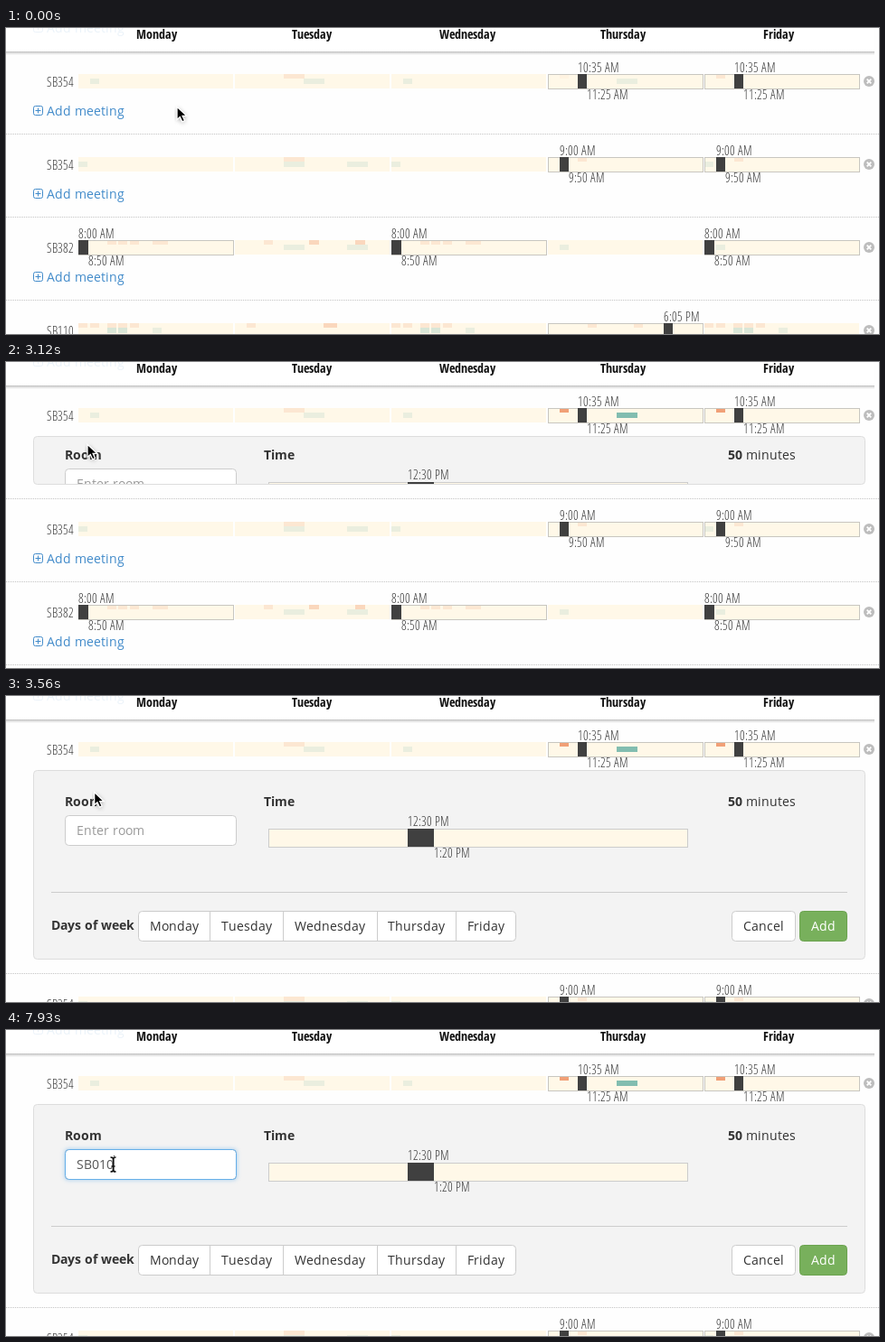
An HTML page that plays this animation: 965x339 px, repeating every 8000 ms.

```html
<!DOCTYPE html>
<html lang="en">
<head>
<meta charset="utf-8">
<title>Weekly meetings</title>
<style>
html, body { margin: 0; width: 100%; height: 100%; overflow: hidden; background: #fefefe; }
svg { display: block; width: 965px; height: 339px; }
text { white-space: pre; }
.link text { fill: #428bca; }
.link path { stroke: #428bca; fill: none; }
.link.over text { fill: #2a6496; }
.link.over path { stroke: #2a6496; }
</style>
</head>
<body>
<svg id="stage" viewBox="0 0 965 339">
  <defs>
    <filter id="blur" x="-20%" y="-60%" width="140%" height="220%"><feGaussianBlur stdDeviation="2.6"/></filter>
    <filter id="soft" x="-20%" y="-20%" width="140%" height="140%"><feGaussianBlur stdDeviation="3"/></filter>
    <linearGradient id="shade" x2="0" y2="1">
      <stop stop-color="#bbb"/><stop offset=".4" stop-color="#ddd"/><stop offset="1" stop-color="#fefefe"/>
    </linearGradient>
    <clipPath id="fold"><rect id="foldBox" x="30" y="82" width="921" height="0"/></clipPath>
  </defs>
  <rect width="965" height="339" fill="#fefefe"/>
  <g id="top"></g>
  <g id="rest"></g>
  <g id="panel">
    <rect id="panelBox" x="30.5" y="82.5" width="919" rx="4" fill="#f3f3f3" stroke="#ddd"/>
    <g clip-path="url(#fold)"><g id="form"></g></g>
  </g>
  <g id="menu"></g>
  <g id="head"></g>
  <g id="arrow">
    <path d="M1 2V17l3.4-3 2.4 5.4 3-1.3-2.4-5.2h4.6z" opacity=".35" filter="url(#blur)"/>
    <path d="M1 1.2V15.500l3.300-3 2.400 5.300 2.800-1.200-2.400-5.200h4.600z" stroke="#fff" stroke-width="1.300"/>
  </g>
  <g id="hand">
    <path d="M4.5 9V2.2C4.5 .2 7.4 .2 7.4 2.2V7c.6-1.2 2.5-1 2.7.4.8-1 2.4-.6 2.6.6 1-.6 2.3 0 2.3 1.4 0 3.4-.6 4.6-1.7 6.6v2.5H6.2v-2C4.5 14.4 2.7 12 1.4 10.3.4 8.8 2.2 7.6 3.4 8.6z" fill="#fff" stroke="#000" stroke-width="1.1"/>
    <path d="M7.5 12v4M9.6 12v4M11.7 12v4" stroke="#000" stroke-width=".9"/>
  </g>
  <g id="beam" fill="none">
    <path d="M-3 -8Q0 -8 0 -6Q0 -8 3 -8M0 -6V6M-3 8Q0 8 0 6Q0 8 3 8M-2 2H2" stroke="#fff" stroke-width="2.6" opacity=".7"/>
    <path id="beamLine" d="M-3 -8Q0 -8 0 -6Q0 -8 3 -8M0 -6V6M-3 8Q0 8 0 6Q0 8 3 8M-2 2H2" stroke="#111"/>
  </g>
</svg>
<script>
const $ = id => document.getElementById(id);
const rect = (x, y, w, h, fill, more = '') =>
  `<rect x="${x}" y="${y}" width="${w}" height="${h}" fill="${fill}" ${more}/>`;
const box = (x, y, w, h, fill, line, more = '') =>
  rect(x + .5, y + .5, w - 1, h - 1, fill, `stroke="${line}" ${more}`);
const show = (id, on) => { $(id).style.display = on ? '' : 'none'; };
const move = (id, x, y) => $(id).setAttribute('transform', `translate(${x} ${y})`);

const PLAIN = "400 14px 'Open Sans', sans-serif";
const BOLD = "700 14px 'Open Sans', sans-serif";
const NARROW = "300 condensed 14px 'Open Sans Condensed Light', 'Open Sans', sans-serif";
const DAY = "700 condensed 14px 'Open Sans Condensed', 'Open Sans', sans-serif";
const pen = document.createElement('canvas').getContext('2d');

// Every glyph advances by a whole number of pixels
function advances(s, font, bold = 0) {
  return [...s].map((c, i) => {
    pen.font = i < bold ? BOLD : font;
    return Math.round(pen.measureText(c).width);
  });
}
const sum = list => list.reduce((a, b) => a + b, 0);

// anchor: 0 start, .5 middle, 1 end; the first `bold` letters are set in bold
function text(x, y, s, font = PLAIN, { anchor = 0, fill = '#333', bold = 0 } = {}) {
  const adv = advances(s, font, bold);
  let at = Math.round(x - anchor * sum(adv));
  const xs = adv.map(w => (at += w) - w).join(' ');
  const head = bold ? `<tspan style="font:${BOLD}">${s.slice(0, bold)}</tspan>` : '';
  return `<text x="${xs}" y="${y}" fill="${fill}" style="font:${font}">${head}${s.slice(bold)}</text>`;
}

const CREAM = '#fff8e8', DARK = '#404040', ORANGE = '#f1a077', GREEN = '#82bdb0';
const PITCH = 173, LEFT = 80;
const DAYS = ['Monday', 'Tuesday', 'Wednesday', 'Thursday', 'Friday'];
const dayX = d => LEFT + d * PITCH;

// Blocks: orange ones fill the upper band of a bar, green ones the middle band
const blocks = [[], [], [], []];
const put = (color, dy, h, alpha) => (row, days, offsets, w = 10, a = alpha, cls = '') => {
  for (const d of days) for (const o of offsets)
    blocks[row].push(rect(dayX(d) + o, 51 + 92 * row + dy, w, h, color, `opacity="${a}" class="${cls}"`));
};
const orange = put(ORANGE, 0, 5, .2), green = put(GREEN, 5, 6, .17);

green(0, [0, 2], [13]);
orange(0, [1], [54], 23);
green(0, [1], [76], 23);
orange(0, [3], [13], 10, .06, 'hot');
orange(0, [4], [13], 10, .2, 'hot');
green(0, [3], [76], 23, .17, 'hot');

green(1, [0, 2, 4], [0]);
orange(1, [1], [54], 23);
green(1, [1], [54, 124], 23);
orange(1, [3, 4], [33]);

orange(2, [0, 2], [32, 44, 57]);
orange(2, [0, 2], [82], 17);
orange(2, [1], [32]);
orange(2, [1], [82, 133], 11, .38);
green(2, [1], [54, 124], 23);
green(2, [3, 4], [13]);

orange(3, [0, 2, 4], [0, 13, 32, 44, 57]);
green(3, [0, 2, 4], [32, 44], 10, .3);
green(3, [0, 2, 4], [82]);
orange(3, [1], [13]);
orange(3, [1], [98], 15, .38);
orange(3, [3], [44, 95]);

const rows = [
  { room: 'SB354', days: [3, 4], at: 33, from: '10:35 AM', to: '11:25 AM' },
  { room: 'SB354', days: [3, 4], at: 13, from: '9:00 AM', to: '9:50 AM' },
  { room: 'SB382', days: [0, 2, 4], at: 0, from: '8:00 AM', to: '8:50 AM' },
  { room: 'SB110', days: [3], at: 128, from: '6:05 PM', to: '6:55 PM' }
];

const link = (y, id = '') => `<g class="link" id="${id}">
  <path d="M32.5 ${y - 10.5}h6q2 0 2 2v6q0 2 -2 2h-6q-2 0 -2 -2v-6q0 -2 2 -2zM32.5 ${y - 5.5}h6M35.5 ${y - 8.5}v6"/>
  ${text(45, y, 'Add meeting')}</g>`;

const bars = (r, i) => {
  const y = 51 + 92 * i;
  let s = text(75, y + 14, r.room, NARROW, { anchor: 1 });
  for (let d = 0; d < 5; d++) s += rect(dayX(d), y, 171, 16, CREAM);
  s += blocks[i].join('');
  for (const d of r.days) {
    const x = dayX(d) + r.at, w = r.at ? 10 : 11;
    s += box(dayX(d), y, 172, 17, 'none', '#c8c6c0') + rect(x, y, w, 16, DARK)
      + text(x, y - 2, r.from, NARROW) + text(x + w, y + 28, r.to, NARROW);
  }
  return s + `<circle cx="954" cy="${y + 8}" r="6" fill="#bdbdbd"/>
    <path d="M951.7 ${y + 5.7}l4.6 4.6m0 -4.6l-4.6 4.6" stroke="#fff" stroke-width="1.8"/>`;
};
const rule = y => `<path d="M0 ${y}H965" stroke="#c4c4c4" stroke-dasharray="1 1"/>`;

$('top').innerHTML = bars(rows[0], 0) + link(97, 'add')
  + '<path id="under" d="M41 98.5H131" stroke="#2a6496"/>';
$('rest').innerHTML = rule(117.5) + rows.slice(1).map((r, i) =>
  bars(r, i + 1) + link(189 + 92 * i) + rule(209.5 + 92 * i)).join('');

$('head').innerHTML = rect(0, 0, 960, 26, '#fff', 'opacity=".9"') + rect(0, 26, 960, 4, 'url(#shade)')
  + `<g opacity=".1">${link(5)}</g>`
  + DAYS.map((s, i) => text(166 + 172 * i, 12, s, DAY, { anchor: .5, fill: '#111' })).join('');

const button = (x, w, label, fill = '#fff', line = '#ccc', color = '#333') =>
  box(x, 238, w, 34, fill, line, 'rx="4"')
  + text(x + w / 2, 260, label, PLAIN, { anchor: .5, fill: color });

$('form').innerHTML = text(65, 122, 'Room', BOLD) + text(285, 122, 'Time', BOLD)
  + text(798, 122, '50 minutes', PLAIN, { bold: 2 })
  + rect(65, 132, 190, 34, '#66afe9', 'rx="4" id="glow" filter="url(#blur)"')
  + box(65, 132, 190, 34, '#fff', '#ccc', 'rx="4"')
  + box(65, 132, 190, 34, 'none', '#66afe9', 'rx="4" id="ring"')
  + '<g id="entry"></g>' + rect(78, 139, 1, 19, '#333', 'id="caret"')
  + box(290, 147, 464, 21, CREAM, '#ccc') + rect(444, 147, 29, 20, DARK)
  + text(444, 144, '12:30 PM', NARROW) + text(473, 179, '1:20 PM', NARROW)
  + rect(50, 217, 880, 1, '#ccc') + text(50, 259, 'Days of week', BOLD)
  + box(146, 238, 418, 34, '#fff', '#ccc', 'rx="4"')
  + [225, 306, 410, 497].map(x => rect(x, 238, 1, 34, '#ccc')).join('')
  + DAYS.map((s, i) => text([159, 238, 319, 422, 510][i], 260, s)).join('')
  + button(802, 71, 'Cancel') + button(877, 53, 'Add', '#78b05c', '#6ba34f', '#fff');

const rooms = ['SB001', 'SB002', 'SB003', 'SB010', 'DC020', 'SB030', 'DC030A', 'SB031', 'SB040'];

function menu(typed) {
  const list = typed.length < 2 ? rooms : rooms.filter(r => r.startsWith(typed));
  const h = 12 + 26 * list.length;
  return rect(65, 173, 160, h, '#000', 'rx="4" opacity=".25" filter="url(#soft)"')
    + box(65, 168, 160, h, '#fff', '#c4c4c4', 'rx="4"') + rect(66, 174, 158, 26, '#4f8dc7')
    + list.map((r, i) => text(86, 192 + 26 * i, r, PLAIN, {
      bold: r.startsWith(typed) ? typed.length : 0,
      fill: i ? '#333' : '#fff'
    })).join('');
}

let shown = null;
function drawEntry(typed) {
  if (shown === typed) return;
  shown = typed;
  $('entry').innerHTML = text(78, 154, typed || 'Enter room', PLAIN, { fill: typed ? '#555' : '#999' });
  $('caret').setAttribute('x', 78 + sum(advances(typed, PLAIN)));
  $('menu').innerHTML = typed && typed.length < 5 ? menu(typed) : '';
}

// Progress 0..1 that advances in n even steps, the first at a and the last at b
const steps = (t, a, b, n) => t < a ? 0 : Math.min(n, 1 + Math.floor((t - a + 5) / (b - a) * (n - 1))) / n;
const smooth = u => u * u * (3 - 2 * u);
const mix = (a, b, u) => a + (b - a) * u;
const last = (t, list) => list.reduce((v, [at, val]) => t >= at ? val : v, list[0][1]);

const typing = [[0, ''], [5600, 'S'], [6760, 'SB'], [7120, 'SB0'], [7210, 'SB01'], [7930, 'SB010']];
const blink = [[0, 0], [4080, 1], [4520, 0], [5060, 1], [6140, 0], [6760, 1], [7660, 0], [7930, 1]];
const hot = [...document.querySelectorAll('.hot')].map(el => [el, +el.getAttribute('opacity')]);

function draw(t) {
  const open = t >= 3120, over = t >= 1690 && !open;
  const lit = steps(t, 1690, 1950, 4);
  for (const [el, dim] of hot) el.setAttribute('opacity', mix(dim, 1, lit));
  $('add').setAttribute('class', over ? 'link over' : 'link');
  show('add', !open);
  show('under', over);

  const tick = 3120 + Math.floor((t - 3120) / 90) * 90;
  const u = Math.min(1, (tick - 2928) / 565);
  const grow = open ? .5 - Math.cos(Math.PI * u) / 2 : 0;
  const h = Math.round(210 * grow);
  show('panel', open);
  if (open) {
    $('panelBox').setAttribute('height', h - 1);
    $('foldBox').setAttribute('height', h - 1);
    move('form', 0, Math.round(-19 * (1 - grow)));
  }
  move('rest', 0, open ? h - 20 : 0);

  const focus = steps(t, 4080, 4170, 2);
  $('glow').setAttribute('opacity', .6 * focus);
  $('ring').setAttribute('opacity', focus);
  drawEntry(last(t, typing));
  show('caret', last(t, blink));

  const go = smooth(steps(t, 540, 1240, 9)), down = smooth(steps(t, 3470, 3910, 6));
  const x = open ? mix(89, 118.5, down) : mix(188, 94, go);
  const y = open ? mix(90, 149, down) : mix(86, 89, go);
  const inField = open && y > 132;
  show('arrow', !over && !inField);
  show('hand', over);
  show('beam', inField);
  move('arrow', x, y);
  move('hand', 85.5, 91);
  const thin = t >= 5330 && t < 7930;
  move('beam', thin ? 118.5 : x, thin ? 150 : y);
  $('beamLine').setAttribute('stroke-width', thin ? 1.1 : 1.7);
}

function loop() {
  draw(performance.now() % 8000);
  requestAnimationFrame(loop);
}
loop();
</script>
</body>
</html>
```
